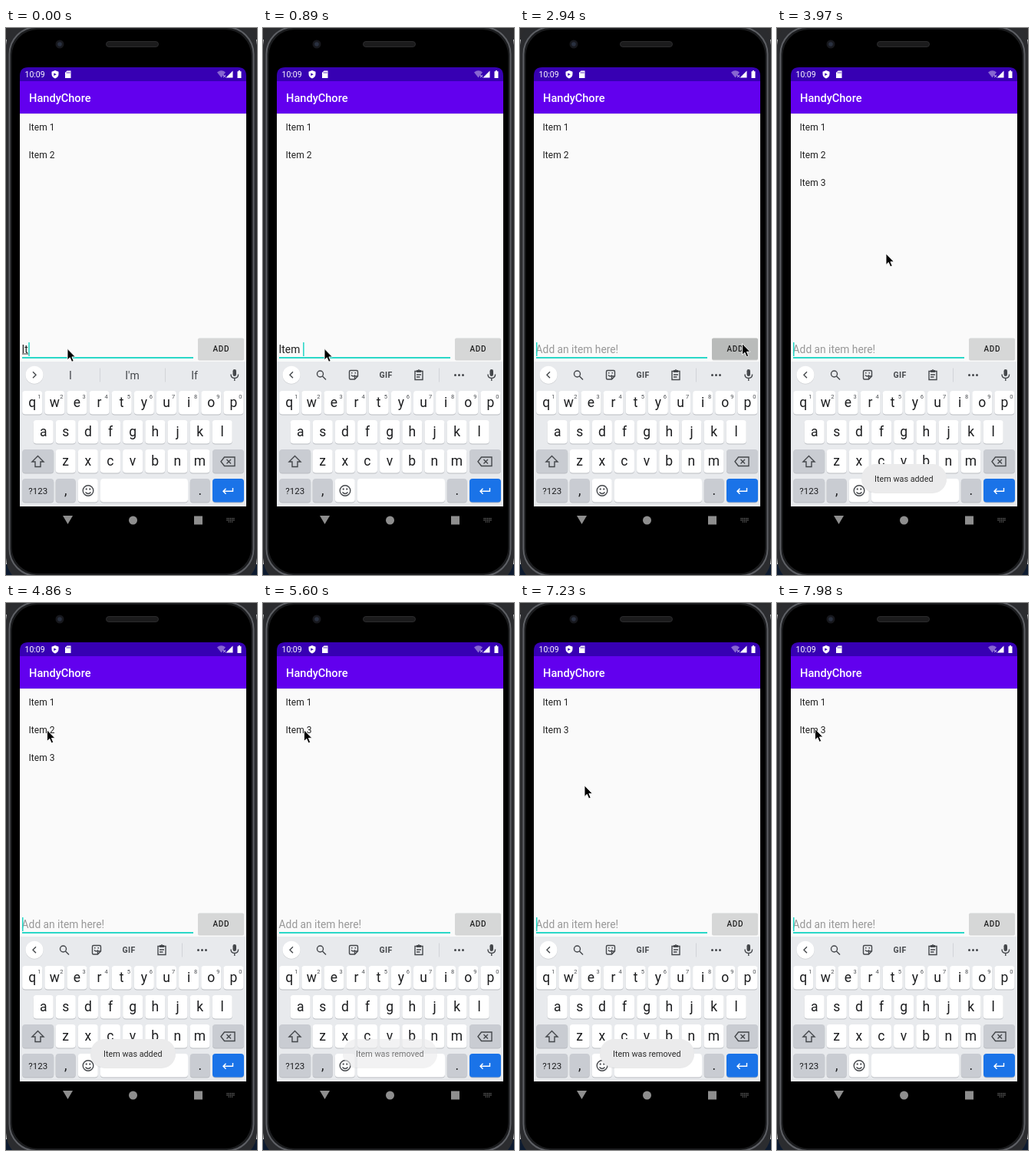
An HTML page that plays this animation: 327 by 710 pixels, repeating every 8 s.

```html
<!DOCTYPE html>
<html lang="en">
<head>
<meta charset="utf-8">
<title>To-do list demo</title>
<style>
html, body { margin: 0; width: 100%; height: 100%; overflow: hidden; background: #fff; }
svg { display: block; width: 327px; height: 710px; font-family: Roboto, sans-serif; }
text { white-space: pre; }
.mid { text-anchor: middle; }
.line { fill: none; stroke: #44474b; stroke-width: 1.4; }
</style>
</head>
<body>
<svg id="stage" viewBox="0 0 327 710" xmlns="http://www.w3.org/2000/svg">
  <!-- phone body -->
  <rect width="327" height="710" fill="#fff"/>
  <rect width="327" height="15" fill="#2c2c2e"/>
  <rect y="696" width="327" height="14" fill="#0d1b30"/>
  <rect x="0" y="-12" width="327" height="734" rx="34" fill="#2b2c2f"/>
  <rect x="4.500" y="-1" width="318" height="712" rx="35" fill="#1b1c1e" stroke="#5d5f64" stroke-width="2"/>
  <rect x="7.500" y="2" width="312" height="706" rx="34" fill="#000"/>
  <circle cx="70" cy="21" r="5.500" fill="#17181d"/>
  <circle cx="70" cy="21" r="2.800" fill="#29303f"/>
  <rect x="130.500" y="17.500" width="68" height="7" rx="3.500" fill="#1b1b1c" stroke="#2b2b2d"/>

  <!-- app -->
  <rect x="18" y="69" width="295" height="552" fill="#fafafa"/>
  <path d="M18 69V62Q18 51 29 51H302Q313 51 313 62V69Z" fill="#3700b3"/>
  <rect x="18" y="111" width="295" height="1" fill="#e6e6e8"/>
  <rect x="18" y="69" width="295" height="42" fill="#6200ee"/>
  <g fill="#fff">
    <text x="24.500" y="64" font-size="10.5">10:09</text>
    <path d="M64 55l4.500 1.700v3.300q0 3.700-4.500 5.500q-4.500-1.800-4.500-5.500v-3.300z"/>
    <path d="M79.500 55.500h5v9.500h-7.500v-7z"/>
    <path d="M275 57.500q5.500-4.500 11 0l-5.500 7z" opacity=".4"/>
    <path d="M295.500 55.500v9h-9z"/>
    <path d="M303 55h2v1.200h1.500v8.800h-5v-8.800h1.500z"/>
    <text x="30" y="96" font-size="14.6" font-weight="500">HandyChore</text>
  </g>
  <path d="M62.300 58.500l3.500 1.700-3.500 1.700z" fill="#3700b3"/>
  <path d="M79.500 57v2M81.300 57v2M83 57v2" stroke="#3700b3" stroke-width=".7"/>
  <path d="M283 61l3 3m0-3l-3 3" stroke="#fff" stroke-width=".8"/>
  <g id="items" font-size="12" fill="#202020"></g>

  <text id="entry" x="20.600" y="422" font-size="13.8"></text>
  <rect id="compose" x="21" y="422.500" height="1" fill="#333"/>
  <rect id="caret" y="408" width="1.500" height="18" fill="#1fd5c4"/>
  <rect x="21" y="427" width="223" height="2" fill="#2bd8c8"/>
  <rect x="250" y="403.500" width="60" height="28" rx="2" fill="#bbb" opacity=".6"/>
  <rect id="button" x="250" y="402.500" width="60" height="28" rx="2"/>
  <text class="mid" x="280.300" y="420" font-size="10" font-weight="500" letter-spacing=".6" fill="#202020">ADD</text>

  <!-- keyboard -->
  <rect x="18" y="433" width="295" height="188" fill="#e8eaed"/>
  <circle cx="37" cy="450.800" r="11.700" fill="#cfd1d4"/>
  <circle cx="37" cy="450.200" r="11.500" fill="#fff"/>
  <path id="chevron" class="line"/>
  <g id="words" class="mid" font-size="14" fill="#45484c">
    <path d="M122.500 441.500v18M207.500 441.500v18" stroke="#d2d4d8"/>
    <text x="84" y="455.500"></text><text x="164.500" y="455.500"></text><text x="245.500" y="455.500"></text>
  </g>
  <g id="tools">
    <circle class="line" cx="74.500" cy="449" r="4"/>
    <path class="line" d="M77.500 452l4.500 4.500"/>
    <path class="line" d="M114 444.500h8q1.500 0 1.500 1.500v6l-4 4h-5.500q-1.500 0-1.500-1.500v-8.500q0-1.500 1.500-1.500M123.500 452h-4v4"/>
    <path class="line" d="M115 450.500q2.500 3 5 0"/>
    <path d="M115 447h1.500v1.500h-1.500zM119.500 447h1.500v1.500h-1.500z" fill="#44474b"/>
    <text class="mid" x="160" y="454" font-size="10.5" font-weight="700" letter-spacing=".4" fill="#44474b">GIF</text>
    <path class="line" d="M198 445.500h10v11h-10z"/>
    <path d="M200 444h2q1-2 2 0h2v3h-6z" fill="#44474b"/>
    <path class="line" d="M200 450h6M200 453h4.500"/>
    <path d="M229.500 441.500v18" stroke="#d2d4d8"/>
    <g fill="#44474b"><circle cx="250.500" cy="450.500" r="1.500"/><circle cx="255.500" cy="450.500" r="1.500"/><circle cx="260.500" cy="450.500" r="1.500"/></g>
  </g>
  <rect x="295.500" y="443" width="4.500" height="9" rx="2.250" fill="#44474b"/>
  <path class="line" d="M293 449.500q0 5 4.800 5t4.800-5M297.800 454.500v3.500"/>
  <g id="keys"></g>
  <path class="line" d="M41.500 555.500l7.500 7.500h-4v6.500h-7v-6.500h-4z"/>
  <path class="line" d="M284.500 557h13.500v11.500h-13.500l-4.500-5.750zM287.500 560l5.500 5.500m0-5.500l-5.500 5.500"/>
  <circle class="line" cx="107" cy="600.500" r="6.800"/>
  <path class="line" d="M103.500 602.500q3.500 4 7 0"/>
  <path d="M103.700 597.500h2v2h-2zm4.600 0h2v2h-2z" fill="#44474b"/>
  <path class="line" d="M295.500 597v4.300h-12.500m3.500-3.500l-3.500 3.500 3.500 3.500" style="stroke:#fff"/>

  <!-- navigation -->
  <rect x="18" y="621" width="295" height="38" fill="#000"/>
  <g fill="#8e8e8e">
    <path d="M74 633h13l-6.500 11z"/>
    <circle cx="165.500" cy="639" r="5.500"/>
    <rect x="245" y="633.500" width="11" height="11"/>
    <path d="M287.500 636.500h11M287.500 638.700h11M289.700 641h6.500" stroke="#8e8e8e" stroke-width="1.200" stroke-dasharray="1.200 1"/>
  </g>

  <g id="toast">
    <rect y="567" height="37" rx="18.500" fill="#aaa" opacity=".25"/>
    <rect y="566" height="37" rx="18.500" fill="#ebebec"/>
    <text class="mid" x="165.300" y="588.800" font-size="10.8" fill="#2a2a2a"></text>
  </g>
  <path id="pointer" d="M0 .8V15.400L3.300 12.300L5.700 17.800L8.200 16.800L5.900 11.400H10.400Z" fill="#000" stroke="#fff" stroke-width=".9"/>
</svg>
<script>
const LOOP = 8000;
const $ = id => document.getElementById(id);
const clamp = v => Math.max(0, Math.min(1, v));

function add(parent, tag, attrs, text) {
  const el = document.createElementNS("http://www.w3.org/2000/svg", tag);
  for (const k in attrs) el.setAttribute(k, attrs[k]);
  if (text) el.textContent = text;
  parent.appendChild(el);
  return el;
}

function key(x, y, w, label, fill = "#fff", size = 17.5) {
  const g = $("keys");
  add(g, "rect", { x, y: y + 1, width: w, height: 30.5, rx: 4, fill: "#b9bcc1" });
  add(g, "rect", { x, y, width: w, height: 30.5, rx: 4, fill });
  if (label) add(g, "text", { x: x + w / 2, y: y + (size < 14 ? 19.5 : 21), class: "mid", "font-size": size, fill: "#1c1d1f" }, label);
}

function buildKeys() {
  const pitch = 29.13, w = 26, gray = "#c9ccd2";
  [["qwertyuiop", 21.2, 471], ["asdfghjkl", 35.7, 509], ["zxcvbnm", 64.7, 547]].forEach(([row, x, y]) =>
    [...row].forEach((c, i) => key(x + i * pitch, y, w, c)));
  for (let i = 0; i < 10; i++)
    add($("keys"), "text", { x: 43.3 + i * pitch, y: 480.5, class: "mid", "font-size": 7.5, fill: "#4a4d51" }, String((i + 1) % 10));
  key(21.2, 547, 41, "", gray);
  key(269, 547, 41, "", gray);
  key(21.2, 585, 41, "?123", gray, 11.5);
  key(64.7, 585, w, ",", gray);
  key(93.8, 585, w, "");
  key(123, 585, 114, "");
  key(239.8, 585, w, ".", gray);
  key(269, 585, 41, "", "#1a73e8");
}

// The screen only refreshes at these moments: [from, to, steps].
const ticks = [0];
[[150, 600, 4], [890, 890, 1], [1460, 1600, 2], [1900, 2940, 8], [3080, 3670, 5], [3970, 4410, 4],
 [4860, 5900, 8], [6040, 6630, 5], [6930, 7830, 7], [7980, 7980, 1]].forEach(([a, b, n]) => {
  for (let i = 0; i < n; i++) ticks.push(n > 1 ? Math.floor((a + (b - a) * i / (n - 1)) / 10) * 10 : a);
});

// Mouse path: time, x, y.
const path = [
  [0, 80, 415.5], [1890, 80, 415.5], [1900, 175.5, 416], [2050, 228, 436], [2190, 262, 440], [2340, 283, 422],
  [2640, 289.5, 409], [3670, 289.5, 408.5], [3970, 142, 292], [4120, 82, 205], [4260, 58, 172],
  [4410, 53.5, 164], [5600, 53.5, 164], [5750, 62, 186], [5900, 90, 231], [6040, 120, 305], [6190, 138, 352],
  [6330, 142, 365.5], [6930, 142, 365.5], [7080, 118, 312], [7230, 84, 236], [7380, 60, 184],
  [7530, 50.5, 166], [7680, 49.5, 162.5], [8000, 49.5, 162.5]
];

function mouseAt(t) {
  const i = Math.max(1, path.findIndex(p => p[0] >= t));
  const [t0, x0, y0] = path[i - 1], [t1, x1, y1] = path[i];
  const k = clamp((t - t0) / (t1 - t0));
  return [x0 + (x1 - x0) * k, y0 + (y1 - y0) * k];
}

const entryAt = t => t < 150 ? "It" : t < 300 ? "Ite" : t < 600 ? "Item" : t < 1460 ? "Item " : t < 2940 ? "Item 3" : "";
const wordsAt = t => t < 300 ? ["I", "I'm", "If"] : t < 450 ? ["It", "Item", "Items"] : ["Item", "Items", "Itemized"];
const itemsAt = t => t < 3080 ? [1, 2] : t < 5450 ? [1, 2, 3] : [1, 3];

// The blink restarts whenever the text changes.
function caretOn(t) {
  if (t < 1460) return true;
  const since = t < 2940 ? 1460 : 2800;
  return Math.floor((t - since) / 504) % 2 === 0;
}

const rows = [0, 1, 2].map(i => add($("items"), "text", { x: 29.6, y: 133.4 + i * 36 }));
const show = (el, on) => el.setAttribute("visibility", on ? "visible" : "hidden");
const set = (el, k, v) => el.setAttribute(k, v);

function drawEntry(t) {
  const value = entryAt(t), entry = $("entry");
  entry.textContent = value || "Add an item here!";
  set(entry, "fill", value ? "#202020" : "#989898");
  const len = value ? entry.getComputedTextLength() : 0;
  set($("caret"), "x", 21 + len);
  show($("caret"), caretOn(t));
  set($("compose"), "width", Math.min(len, 30.5));
  show($("compose"), t < 890);
}

function drawStrip(t) {
  const typing = t < 890;
  show($("words"), typing);
  show($("tools"), !typing);
  set($("chevron"), "d", typing ? "M35 446.200l4 4-4 4" : "M39 446.200l-4 4 4 4");
  const words = wordsAt(t);
  $("words").querySelectorAll("text").forEach((el, i) => el.textContent = words[i]);
}

function drawToast(t) {
  const first = t < 5450, start = first ? 3080 : 5380, end = first ? 5080 : 7500;
  const w = first ? 111 : 123;
  const [shade, box, label] = $("toast").children;
  for (const r of [shade, box]) {
    set(r, "x", 165.5 - w / 2);
    set(r, "width", w);
  }
  label.textContent = first ? "Item was added" : "Item was removed";
  set($("toast"), "opacity", Math.min(clamp((t - start) / 350), 1 - clamp((t - end) / 320)));
}

function render(time) {
  const t = ticks.filter(s => s <= time).pop();
  const items = itemsAt(t);
  rows.forEach((row, i) => row.textContent = items[i] ? "Item " + items[i] : "");
  drawEntry(t);
  drawStrip(t);
  drawToast(t);
  set($("button"), "fill", t >= 2940 && t < 3080 ? "#b9bbba" : t >= 3080 && t < 3220 ? "#c8c9c9" : "#d6d7d7");
  set($("pointer"), "transform", `translate(${mouseAt(t)})`);
}

buildKeys();
const begin = performance.now();
function loop() {
  render((performance.now() - begin) % LOOP);
  requestAnimationFrame(loop);
}
loop();
</script>
</body>
</html>
```
